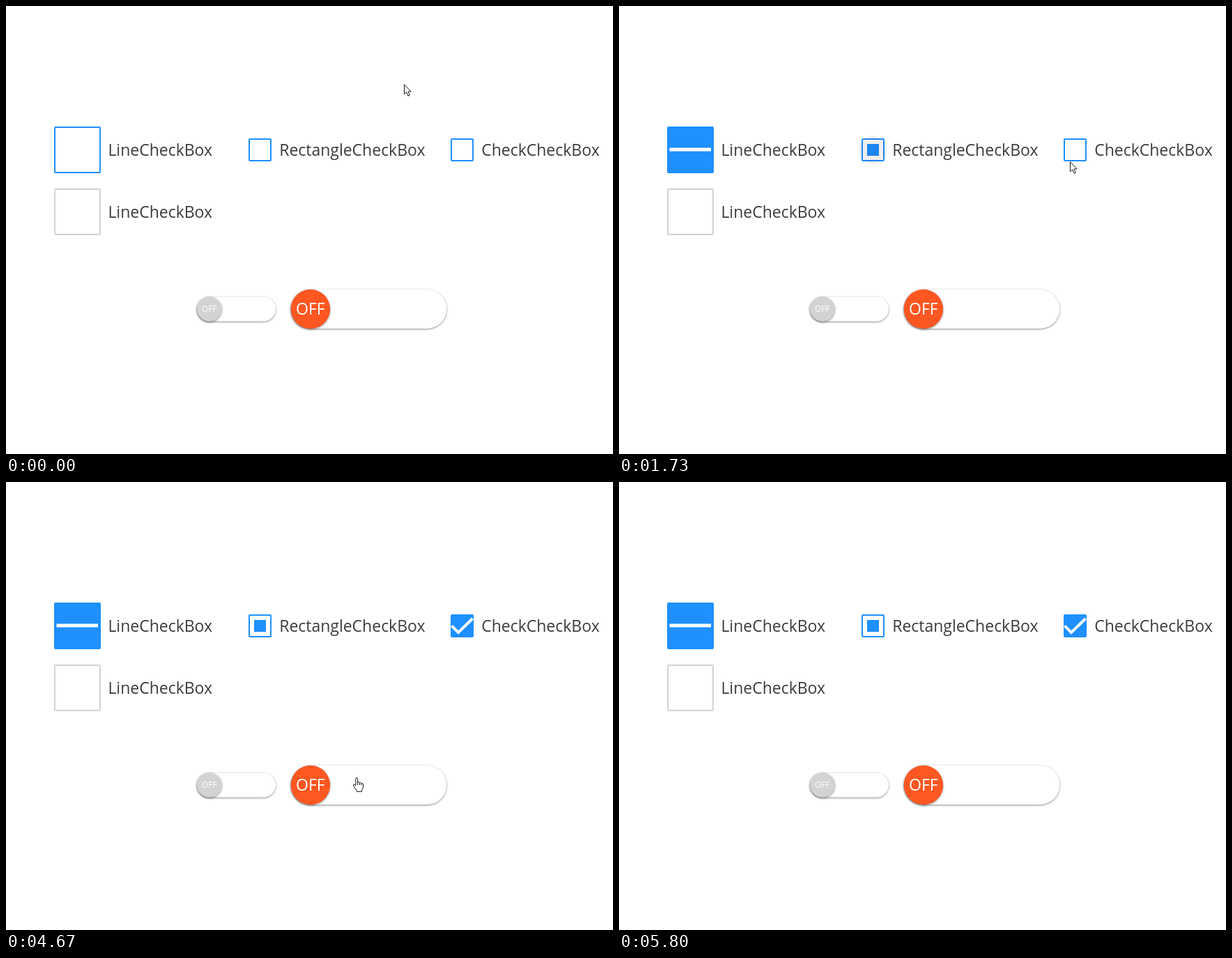
Animation, 871 px wide and 643 px high, one loop 5870 ms. Source, as an HTML page:

```html
<!DOCTYPE html>
<html lang="en">
<head>
<meta charset="utf-8">
<title>Check boxes and toggles</title>
<style>
  html, body { margin: 0; width: 100%; height: 100%; overflow: hidden; background: #fff; }
  svg { display: block; width: 871px; height: 643px; }
  text { font: 23px "Open Sans", "Noto Sans", sans-serif; fill: #3c3c3c; }
  .knob-text { fill: #fff; text-anchor: middle; }
  .small { font-size: 11.7px; }
  .shadow { filter: drop-shadow(0 1.2px 1.4px rgba(0, 0, 0, .45)); }
  .ripple { fill: #000; }
  .mark { fill: none; stroke: #fff; }
</style>
</head>
<body>
<svg viewBox="0 0 871 643">
  <g stroke="#1e90ff" stroke-width="2" fill="#1e90ff" fill-opacity="0">
    <rect id="box0" x="70" y="174" width="65" height="65" rx="1"/>
    <rect id="box1" x="349" y="191" width="31" height="31" rx="1"/>
    <rect id="box2" x="639" y="191" width="31" height="31" rx="1"/>
    <rect x="70" y="263" width="65" height="65" rx="1" stroke="#d3d3d3"/>
  </g>
  <path id="mark0" class="mark" pathLength="1" stroke-width="5" d="M72.5 206H132"/>
  <rect id="mark1" fill="#1e90ff"/>
  <path id="mark2" class="mark" pathLength="1" stroke-width="4" d="M639.5 206.3L649 216L669.5 196"/>
  <circle id="ripple0" class="ripple" cx="102.2" cy="206.5"/>
  <circle id="ripple1" class="ripple" cx="364.5" cy="206.5"/>
  <circle id="ripple2" class="ripple" cx="654.5" cy="206.5"/>

  <text x="146.4" y="215">LineCheckBox</text>
  <text x="392.2" y="215">RectangleCheckBox</text>
  <text x="682.2" y="215">CheckCheckBox</text>
  <text x="146.4" y="304">LineCheckBox</text>

  <rect class="shadow" x="274" y="417.5" width="113" height="35" rx="17.5" fill="#fff"/>
  <circle class="shadow" cx="292" cy="435" r="17.7" fill="#d3d3d3"/>
  <text class="knob-text small" x="291.7" y="439.2">OFF</text>

  <rect id="track" class="shadow" x="409" y="406.8" width="223.3" height="56.2" rx="28.1"/>
  <g id="knob">
    <circle class="shadow" cy="435" r="28.2" fill="#ff5722"/>
    <text id="state" class="knob-text" y="443.3"></text>
  </g>

  <g id="cursor" fill="#fff" stroke="#15151f" stroke-width="1" stroke-linejoin="round">
    <path id="arrow" d="M.5 .7V14.6L3.7 11.7L6 17.1L8.2 16.2L6 10.9H10.2Z"/>
    <path id="hand" d="M-1.2 1.8Q-1.2 .5 .2 .5T1.6 1.8V7.2Q2.2 6.2 3.4 6.6Q4.3 7 4.3 8Q5.2 7 6.2 7.5Q7 8 7 9Q8.2 8 9 9Q9.5 9.6 9.5 11V14Q9.5 16 7.6 18V20.3H.2V18.4Q-2 16.5 -4.4 12Q-5 10.7 -4 10.1Q-2.8 9.7 -1.2 12ZM1.6 7.2V11M4.3 8V11M7 9V11.2"/>
  </g>
</svg>
<script>
const $ = id => document.getElementById(id);
const LOOP = 5870, STEP = 200 / 3;
const clamp = v => Math.max(0, Math.min(1, v));
const smooth = v => v * v * (3 - 2 * v);
const easeOut = v => 1 - (1 - v) ** 2;
const set = (el, attrs) => { for (const k in attrs) el.setAttribute(k, attrs[k]); };

// Pointer path: step, x, y
const path = [
  [0, 571, 112], [8, 99, 229], [13, 99, 229], [17, 422, 221], [19, 366, 226],
  [22, 366, 226], [26, 647, 223], [27, 644, 226], [29, 652, 205], [32, 652, 205],
  [35, 506, 332], [38, 385, 487], [39, 363, 484], [43, 302, 437], [50, 302, 437],
  [51, 275, 382], [56, 92, 300], [62, 92, 300], [64, 108, 292], [70, 503, 424],
  [78, 503, 424], [79, 500, 424], [82, 500, 424], [86, 834, 267]
];
const eased = new Set([0, 18, 22]);

// Check boxes: step of the click, ripple radius
const clicks = [[10, 45.3], [21, 20], [31, 22.8]];

function pointer(n) {
  let i = 0;
  while (i < path.length - 2 && n >= path[i + 1][0]) i++;
  const [a, x, y] = path[i], [b, X, Y] = path[i + 1];
  let k = clamp((n - a) / (b - a));
  if (eased.has(i)) k = smooth(k);
  return [Math.round(x + (X - x) * k), Math.round(y + (Y - y) * k)];
}

function drawBox(i, n) {
  const [start, radius] = clicks[i];
  const age = n - start + .5;
  const p = easeOut(clamp(age / 3.5));
  const mark = $("mark" + i);
  if (i === 1) {
    const s = 17 * p;
    set(mark, { x: 364.5 - s / 2, y: 206.5 - s / 2, width: s, height: s });
  } else {
    set($("box" + i), { "fill-opacity": p });
    set(mark, { "stroke-dasharray": `${p} 2`, visibility: p ? "visible" : "hidden" });
  }
  set($("ripple" + i), {
    r: radius * p,
    opacity: age > 0 ? .1 * clamp((7 - age) / 2.2) : 0
  });
}

function drawToggle(n) {
  const on = smooth(clamp((n - 71.4) / 4.4)) - smooth(clamp((n - 80.4) / 4.4));
  const mix = (a, b) => Math.round(a + (b - a) * on);
  set($("track"), { fill: `rgb(${mix(255, 30)},${mix(255, 144)},255)` });
  set($("knob"), { transform: `translate(${436.9 + 167.6 * on} 0)` });
  $("state").textContent = on > .5 ? "ON" : "OFF";
}

function drawPointer(n) {
  const [x, y] = pointer(n);
  const overToggle = x > 409 && x < 633 && y > 406 && y < 463;
  set($("cursor"), { transform: `translate(${x} ${y})`, display: n > 86 ? "none" : "inline" });
  set($("arrow"), { display: overToggle ? "none" : "inline" });
  set($("hand"), { display: overToggle ? "inline" : "none" });
}

function render(ms) {
  const n = Math.min(87, Math.floor((ms % LOOP + 4) / STEP));
  for (let i = 0; i < 3; i++) drawBox(i, n);
  drawToggle(n);
  drawPointer(n);
}

const begin = performance.now();
function tick() {
  render(performance.now() - begin);
  requestAnimationFrame(tick);
}
tick();
</script>
</body>
</html>
```
